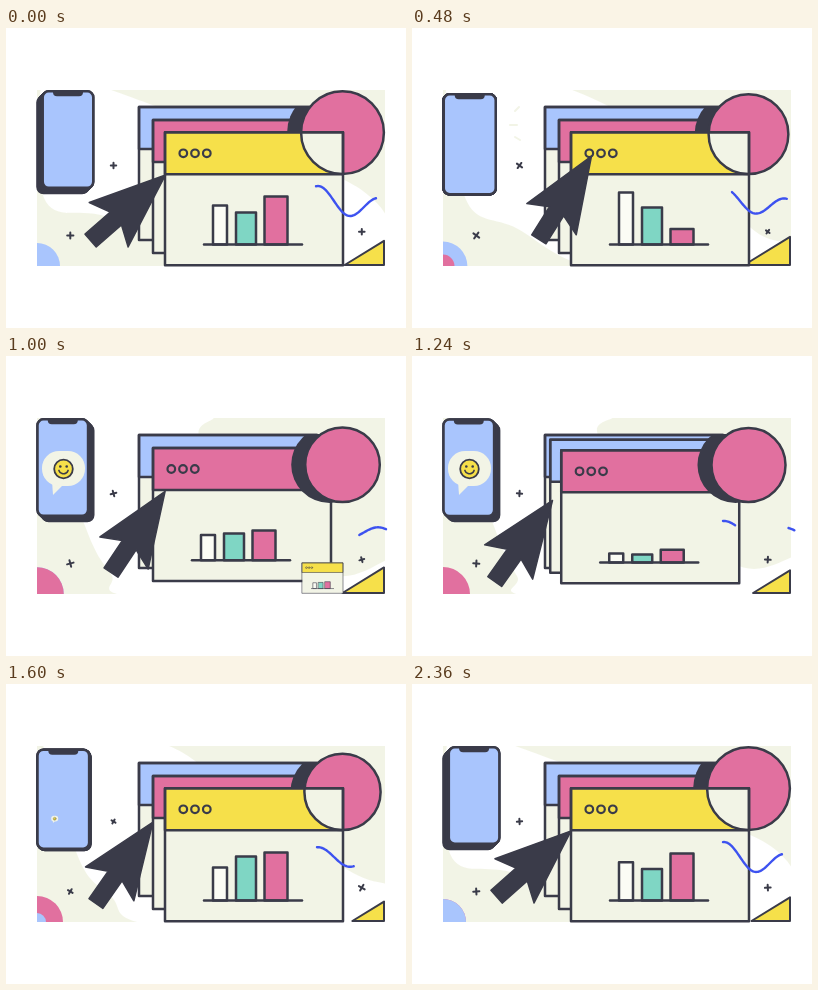
An HTML page with a canvas for the animation above (2.4 s loop, 400x300 px).

```html
<!DOCTYPE html>
<html>
<head>
<meta charset="utf-8">
<style>
html, body { margin: 0; width: 100%; height: 100%; overflow: hidden; background: #fff; }
canvas { display: block; width: 400px; height: 300px; }
</style>
</head>
<body>
<canvas id="stage" width="400" height="300"></canvas>
<script>
const c = document.getElementById('stage').getContext('2d');
const LOOP = 2400, TAU = Math.PI * 2;
const DARK = '#3a3b49', CREAM = '#f2f4e6', BLUE = '#a9c5fd', PINK = '#e1709f',
      YELLOW = '#f6e04a', TEAL = '#7fd6c4', INK = '#3d52f0';
const BEATS = [0, 480, 760, 1240, 1600, 2040, LOOP];

const lerp = (a, b, p) => a + (b - a) * p;
const ramp = (t, a, b) => Math.min(1, Math.max(0, (t - a) / (b - a)));
const ease = p => p * p * (3 - 2 * p);
const swing = (t, mid, amp, peak = 0) => mid + amp * Math.cos(TAU * (t - peak) / LOOP);

// Eases from one value to the next on every beat, then back to the first.
function onBeats(t, ...values) {
  const i = BEATS.findIndex(b => b > t) - 1;
  return lerp(values[i], values[(i + 1) % 6], ease(ramp(t, BEATS[i], BEATS[i + 1])));
}

function mix(a, b, p) {
  const part = (s, i) => parseInt(s.slice(i, i + 2), 16);
  return 'rgb(' + [1, 3, 5].map(i => Math.round(lerp(part(a, i), part(b, i), p))) + ')';
}

function paint(fill, stroke, width = 2.5) {
  if (fill) { c.fillStyle = fill; c.fill(); }
  if (stroke) { c.strokeStyle = stroke; c.lineWidth = width; c.stroke(); }
}
function disc(x, y, r, fill, stroke, width) {
  c.beginPath(); c.arc(x, y, r, 0, TAU); paint(fill, stroke, width);
}
function box(x, y, w, h, fill, stroke, radius = 0) {
  c.beginPath(); c.roundRect(x, y, w, h, radius); paint(fill, stroke);
}
function poly(points, fill, stroke, width) {
  c.beginPath();
  points.forEach(p => c.lineTo(...p));
  if (fill) c.closePath();
  paint(fill, stroke, width);
}
function layer(draw) { c.save(); draw(); c.restore(); }
function scaleAt(x, y, s) { c.translate(x, y); c.scale(s, s); c.translate(-x, -y); }

// Closed smooth curve through the points.
function blob(p, fill) {
  const n = p.length, at = i => p[(i + n) % n];
  const handle = (i, s) => at(i).map((v, k) => v + s * (at(i + 1)[k] - at(i - 1)[k]) / 6);
  c.beginPath(); c.moveTo(...p[0]);
  p.forEach((_, i) => c.bezierCurveTo(...handle(i, 1), ...handle(i + 1, -1), ...at(i + 1)));
  paint(fill);
}

function background(t) {
  box(31, 62, 348, 176, CREAM);
  c.beginPath(); c.rect(31, 62, 348, 176); c.clip();
  blob([
    [40, 40],
    [swing(t, 145, 55, 1050), 58],
    [swing(t, 245, 55), swing(t, 110, 25)],
    [swing(t, 345, 28, 2250), swing(t, 192, 24, 900)],
    [395, swing(t, 215, 15)],
    [400, 260],
    [swing(t, 175, 50), 242],
    [105, swing(t, 205, -15)],
    [swing(t, 60, -22), 170]
  ], '#fff');

  // Each half loop the other colour grows over the quarter disc.
  const half = LOOP / 2, r = swing(t, 25, -2);
  const [base, next] = t < half ? [BLUE, PINK] : [PINK, BLUE];
  disc(31, 238, r, base);
  disc(31, 238, r * ramp(t % half, 180, 820), next);
}

function corner(t) {
  const w = swing(t, 38.5, 7.5, 560);
  poly([[378, 237], [378 - w, 237], [378, 237 - w * .615]], YELLOW, DARK, 2);
}

function plus(t, x, y, r) {
  layer(() => {
    c.translate(x, y); c.rotate(Math.PI * t / LOOP);
    poly([[-r, 0], [r, 0]], null, DARK, 2);
    poly([[0, -r], [0, r]], null, DARK, 2);
  });
}

function squiggle(t) {
  const amp = swing(t, 11.5, 3.5);
  const y = x => 173 + amp * (x < 344
    ? -Math.cos(Math.PI * (x - 312) / 32)
    : .4 + .6 * Math.cos(Math.PI * (x - 344) / 28));
  const piece = (from, to) => {
    const pts = [];
    for (let x = from; x < to; x++) pts.push([x, y(x)]);
    if (pts.length) poly([...pts, [to, y(to)]], null, INK, 2.4);
  };
  const leave = ramp(t, 0, 1300), enter = ramp(t, 1100, LOOP);
  piece(310 + 73 * leave ** 2, 370 + 13 * leave);
  piece(311, 311 + 59 * (1 - (1 - enter) ** 2));
}

function windowFrame(x, y, color, hole) {
  box(x, y, 178, 133, CREAM);
  box(x, y, 178, 42, color);
  if (hole) layer(() => {
    c.beginPath(); c.rect(x, y, 178, 133); c.clip();
    disc(hole.x, hole.y, hole.r, CREAM, DARK);
  });
  box(x, y, 178, 42, null, DARK);
  box(x, y, 178, 133, null, DARK);
}

function content(t, x, y) {
  [18.3, 30, 41.8].forEach(dx => disc(x + dx, y + 21, 3.8, null, DARK, 2.2));
  const base = y + 112.3;
  const bar = (dx, w, h, fill) => box(x + dx, base - h, w, h, fill, DARK);
  bar(48, 14, onBeats(t, 39, 52, 42, 9, 33, 19), '#fbfcf5');
  bar(71, 20, onBeats(t, 32, 37, 46, 8, 44, 17), TEAL);
  bar(99.5, 23, swing(3 * t, 30, 18), PINK);
  poly([[x + 39, base], [x + 137, base]], null, DARK);
}

// The front window shrinks away, then the ones behind step forward.
function windows(t) {
  const r = swing(t, 39.2, 2.2), ball = { x: 336.5, y: 146 - r, r };
  const stepping = t > 1040 && t < 1500;
  const p = stepping ? ease(ramp(t, 1150, 1480)) : 0;
  const tint = stepping ? ease(ramp(t, 1300, 1480)) : 0;
  const x = lerp(147, 159, p), y = lerp(92, 104.3, p), color = mix(PINK, YELLOW, tint);

  windowFrame(133, 79, BLUE);
  if (stepping) {
    const q = ease(ramp(t, 1100, 1440));
    windowFrame(lerp(133, 147, q), lerp(79, 92, q), mix(BLUE, PINK, tint));
  }
  windowFrame(x, y, color);
  if (t > 900 && t < 1500) content(t, x, y);

  layer(() => {
    c.beginPath(); c.rect(133, 78, 204, 160); c.clip();
    disc(ball.x - 13, ball.y, r + 1, DARK);
  });
  disc(ball.x, ball.y, r, PINK, DARK);

  layer(() => {
    if (stepping) {
      c.globalAlpha = tint;
      windowFrame(x, y, color, ball);
      content(t, x, y);
      return;
    }
    // The hole stays on the ball while the window shrinks to its corner.
    const s = t < 1040 ? Math.max(.001, 1 - ramp(t, 720, 1040) ** 2) : 1;
    const ax = 337, ay = 237.3;
    scaleAt(ax, ay, s);
    windowFrame(159, 104.3, YELLOW,
      { x: ax + (ball.x - ax) / s, y: ay + (ball.y - ay) / s, r: r / s });
    content(t, 159, 104.3);
  });
}

function emoji(t) {
  const s = ramp(t, 690, 960) * (1 - ramp(t, 1400, 1640));
  if (!s) return;
  layer(() => {
    scaleAt(47, 139, s);
    poly([[46, 125], [47, 139], [58, 128]], CREAM);
    box(36, 95, 43, 35, CREAM, null, 17);
    disc(57.5, 113, 9.3, YELLOW, DARK, 1.8);
    [-3.2, 3.2].forEach(dx => disc(57.5 + dx, 110.5, 1.3, DARK));
    c.beginPath(); c.arc(57.5, 113, 4.8, .3, Math.PI - .3); paint(null, DARK, 1.6);
  });
}

function phone(t) {
  const turn = swing(t, 0, 6, 1100), depth = Math.abs(turn);
  const x = 31.5 + Math.max(0, -turn) * .9, y = 66.5 - depth * .55;
  const w = 52 - depth * .25, h = 100 - depth * .6;
  for (let k = 1; k > 0; k -= .1)
    box(x + turn * k * .9, y + depth * k * .9, w, h, DARK, DARK, 6);
  box(x, y, w, h, BLUE, DARK, 6);
  box(x + w / 2 - 15, y, 30, 5, DARK, null, [0, 0, 4, 4]);
  emoji(t);
}

function sparks(t) {
  layer(() => {
    c.globalAlpha = ramp(t, 380, 440) * (1 - ramp(t, 520, 600));
    poly([[103, 83], [107, 79]], null, CREAM, 2);
    poly([[98, 97], [105, 97]], null, CREAM, 2);
    poly([[103, 109], [108, 112]], null, CREAM, 2);
  });
}

function cursor(t) {
  layer(() => {
    c.translate(onBeats(t, 159.5, 179.5, 178, 140.5, 147, 147),
                onBeats(t, 147, 128, 126, 144.5, 138, 142));
    c.rotate(onBeats(t, 138.8, 122.3, 121.8, 125.5, 125, 130.4) * TAU / 360);
    const press = Math.max(0, swing(t, 0, 1, 760)) ** 8;
    c.scale(1 - .1 * press, 1 - .1 * press);
    const side = [[75.5, 29.5], [66, 8.5], [99.5, 8.5]];
    const mirrored = side.map(([x, y]) => [x, -y]).reverse();
    poly([[0, 0], ...side, ...mirrored], DARK, DARK, 1.5);
  });
}

function draw(t) {
  c.clearRect(0, 0, 400, 300);
  c.lineJoin = c.lineCap = 'round';
  layer(() => background(t));
  corner(t);
  sparks(t);
  plus(t, 107.5, 137.5, swing(t, 2.7, .5, 600));
  plus(t, 64.3, 207.5, swing(t, 3.1, .5, 600));
  plus(t, 355.8, 203.7, swing(t, 2.8, -.6, 600));
  windows(t);
  squiggle(t);
  phone(t);
  cursor(t);
}

const start = performance.now();
function tick() {
  draw((performance.now() - start) % LOOP);
  requestAnimationFrame(tick);
}
tick();
</script>
</body>
</html>
```
